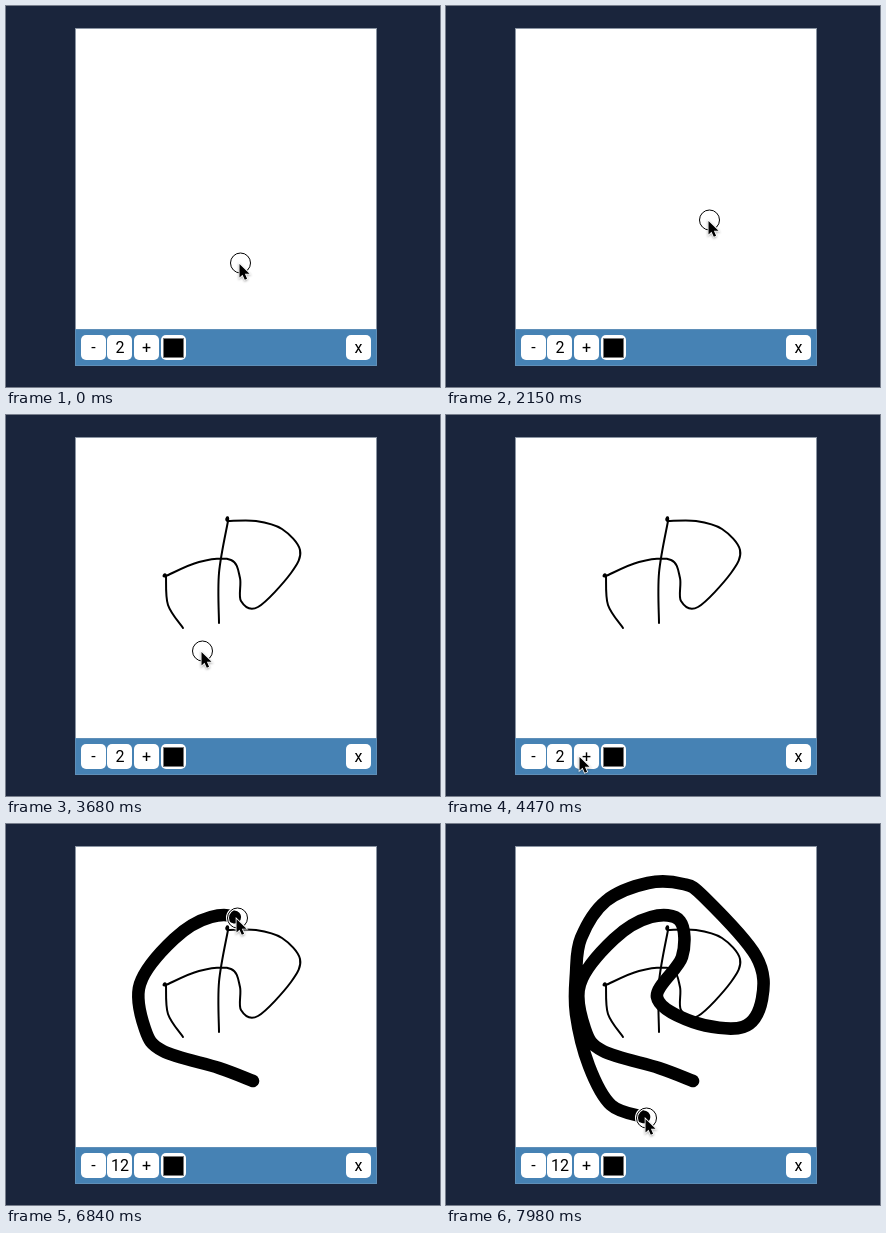
Animation, 434 px wide and 381 px high, one loop 8000 ms. Source, as an HTML page:

```html
<!DOCTYPE html>
<html lang="en">
<head>
<meta charset="utf-8">
<title>Drawing pad</title>
<style>
  html, body { margin: 0; width: 100%; height: 100%; overflow: hidden; background: #1a253c; }
  svg { display: block; width: 434px; height: 381px; }
  text { font: 16px Roboto, sans-serif; text-anchor: middle; }
  .stroke { fill: none; stroke: #000; stroke-linecap: round; stroke-linejoin: round; }
</style>
</head>
<body>
<svg viewBox="0 0 434 381">
  <defs><rect id="button" y="329" width="25" height="25" rx="5" fill="#fff"/></defs>
  <rect x="69.5" y="22.5" width="301" height="337" fill="#fff" stroke="#8b95a3"/>
  <rect x="69.5" y="323.5" width="301" height="36" fill="#4682b4" stroke="#5f8fb8"/>
  <use href="#button" x="75"/>
  <use href="#button" x="101"/>
  <use href="#button" x="128"/>
  <use href="#button" x="155"/>
  <use href="#button" x="340"/>
  <rect x="157.5" y="332.5" width="20" height="19" stroke="#777"/>
  <rect id="selection" x="85" y="333" width="5" height="18" fill="#b3d7ff"/>
  <text x="87.5" y="347">-</text>
  <text id="size" x="114" y="347">2</text>
  <text x="140.5" y="347">+</text>
  <text x="352.5" y="347">x</text>
  <path id="thin" class="stroke" stroke-width="2"/>
  <path id="thick" class="stroke" stroke-width="12.6"/>
  <g id="pointer">
    <g id="ring" fill="none">
      <circle cx="2.5" cy="1" r="10" stroke="#fff" stroke-width="3"/>
      <circle cx="2.5" cy="1" r="10" stroke="#000"/>
    </g>
    <path d="M1.5 2V15.5l3-2.8 2.3 5 2.3-1-2.2-4.9H11.5Z" stroke="#fff" stroke-width="1.6"
      paint-order="stroke" style="filter:drop-shadow(0 1px 1px #0005)"/>
  </g>
</svg>
<script>
const LOOP = 8000, TICK = 88.7;
const $ = id => document.getElementById(id);
const show = (el, on) => el.setAttribute('visibility', on ? 'visible' : 'hidden');
const easeOut = u => 1 - (1 - u) ** 2;

// Catmull-Rom curve through the points; a repeated point makes a corner.
function spline(text) {
  const p = text.split(' ').map(s => s.split(',').map(Number));
  const at = i => p[Math.max(0, Math.min(p.length - 1, i))];
  const handle = (i, sign) => at(i).map((v, k) => v + sign * (at(i + 1)[k] - at(i - 1)[k]) / 6);
  return `M${p[0]}` + p.slice(1).map((q, i) => `C${handle(i, 1)} ${handle(i + 1, -1)} ${q}`).join('');
}

function makeStroke(id, start, end, power, points) {
  const path = $(id);
  path.setAttribute('d', spline(points));
  return { path, start, end, power, length: path.getTotalLength() };
}

const strokes = [
  makeStroke('thin', 29, 39.4, 1,
    '177,213 162,190 160,161 160,161 193,147 225,145 234,163 235,186 252,192 ' +
    '285,158 294,135 276,114 250,106 222,106 222,106 213,158 213,208'),
  makeStroke('thick', 69, 90, 1.27,
    '247,257 213,244 157,227 139,205 134,160 168,115 205,93 234,97 236,133 211,173 247,198 ' +
    '297,203 316,175 310,132 258,73 237,60 202,59 160,77 135,114 130,150 130,190 143,242 165,281 198,293')
];

// Where the pointer rests between strokes; it glides from one stop to the next.
const stops = [
  { from: 0, to: 0, x: 232, y: 256 },
  { from: 3, to: 9, x: 229, y: 246 },
  { from: 18, to: 19, x: 167, y: 339 },
  { from: 21, to: 21, x: 160, y: 385 },
  { from: 22, to: 26, x: 261, y: 213 },
  { from: 28, to: 39, x: 177, y: 213 },
  { from: 40, to: 40, x: 213, y: 209 },
  { from: 45, to: 45, x: 160, y: 281 },
  { from: 50, to: 61, x: 132, y: 340 },
  { from: 64, to: 64, x: 213, y: 295 },
  { from: 67, to: 91, x: 246, y: 256 }
];
const presses = [[0, 5], [8, 10], [18, 20], [24, 27], [29, 42], [52, 55], [58, 60], [67, 91]];

function restingPoint(tick) {
  const i = stops.findLastIndex(s => s.from <= tick);
  const a = stops[i], b = stops[i + 1];
  if (!b || tick <= a.to) return a;
  const u = easeOut((tick - a.to) / (b.from - a.to));
  return { x: a.x + (b.x - a.x) * u, y: a.y + (b.y - a.y) * u };
}

// Reveals the stroke and returns its head while it is being drawn.
function drawStroke({ path, start, end, power, length }, tick) {
  show(path, tick > start);
  const u = Math.max(0, Math.min(1, (tick - start) / (end - start)));
  const drawn = length * u ** power;
  path.setAttribute('stroke-dasharray', `${drawn} ${length * 2}`);
  return tick >= start && tick <= end ? path.getPointAtLength(drawn) : null;
}

function render(now) {
  const tick = Math.floor((now % LOOP + 6) / TICK);
  const head = strokes.map(s => drawStroke(s, tick)).find(Boolean);
  const { x, y } = head || restingPoint(tick);
  $('pointer').setAttribute('transform', `translate(${Math.round(x)} ${Math.round(y)})`);
  show($('ring'), presses.some(([down, up]) => tick >= down && tick < up));
  show($('selection'), tick >= 8 && tick < 24);
  $('size').textContent = 2 + 5 * ((tick >= 54) + (tick >= 59));
}

const start = performance.now();
(function frame() {
  render(performance.now() - start);
  requestAnimationFrame(frame);
})();
</script>
</body>
</html>
```
